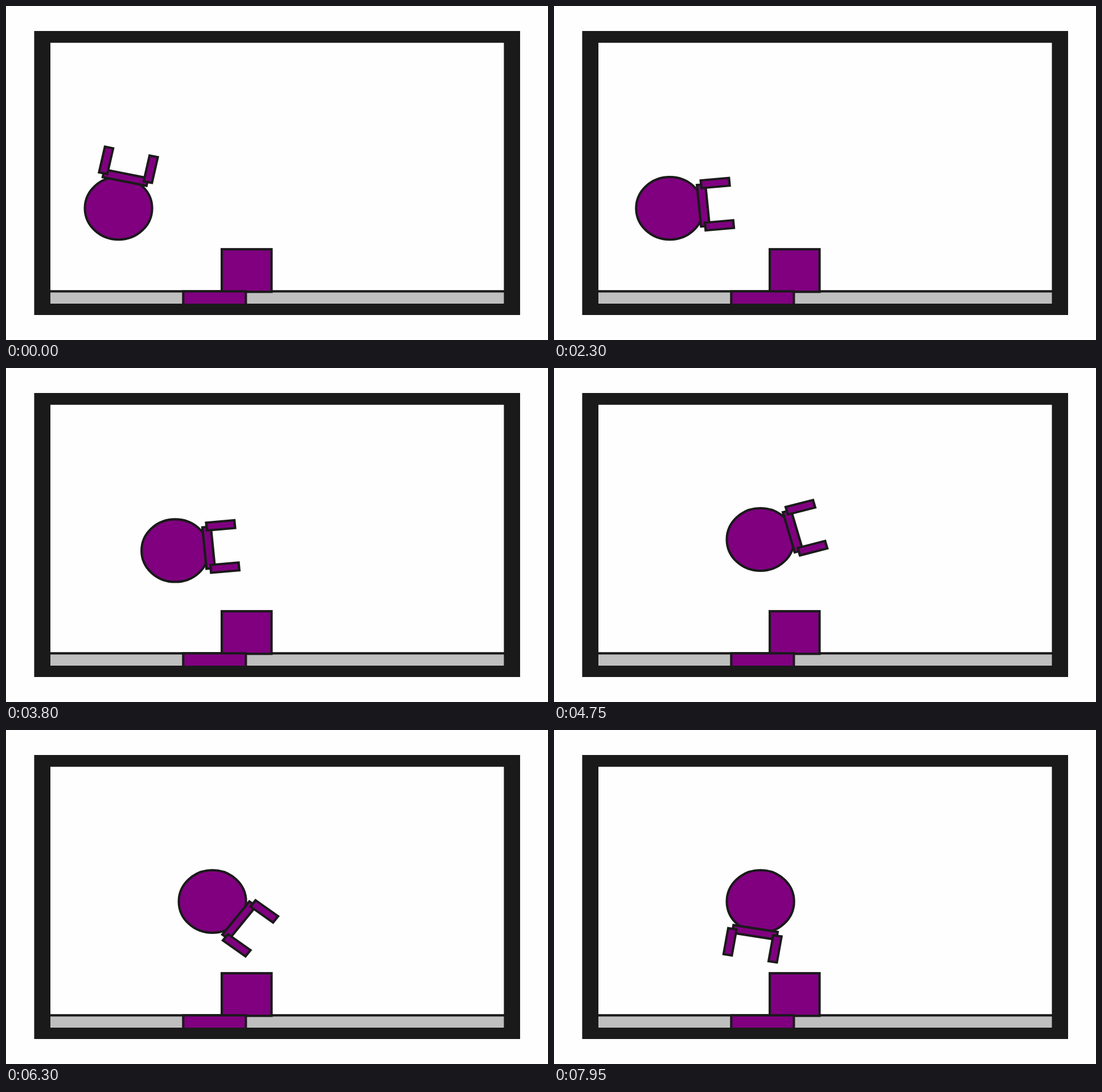
Animation, 952 px wide and 588 px high, one loop 8000 ms. Source, as an HTML page:

```html
<!DOCTYPE html>
<html lang="en">
<head>
<meta charset="utf-8">
<title>Gripper robot</title>
<style>
  html, body { margin: 0; width: 100%; height: 100%; overflow: hidden; background: #fefefe; }
  svg { display: block; width: 100vw; height: 100vh; }
  .shape { fill: #800080; stroke: #1a1a1a; stroke-width: 4.1; }
  #robot * { vector-effect: non-scaling-stroke; }
</style>
</head>
<body>
<svg viewBox="0 0 952 588">
  <rect x="64" y="502.3" width="824" height="30" fill="#bfbfbf" stroke="#1a1a1a" stroke-width="4.1"/>
  <rect class="shape" x="379" y="428.2" width="87.4" height="75"/>
  <rect class="shape" x="311.3" y="502.3" width="110" height="30"/>
  <path d="M49.5 44H903V544H49.5ZM78 64.7V524H874.5V64.7Z" fill="#1a1a1a" fill-rule="evenodd"/>
  <g id="robot" class="shape">
    <circle r=".24"/>
    <g id="arm">
      <rect x=".21" y="-.16" width=".06" height=".32"/>
      <rect x=".24" y=".133" width=".202" height=".06"/>
      <rect x=".24" y="-.193" width=".202" height=".06"/>
    </g>
  </g>
</svg>
<script>
const LOOP = 8000, STEP = 50;
const SCALE_X = 246, SCALE_Y = 229.5;

// Distance covered at time t by a move with steady speed and soft ends of length ramp
function move(t, start, end, amount, ramp) {
  const span = end - start, u = Math.min(Math.max(t - start, 0), span);
  const speed = amount / (span - ramp);
  if (u < ramp) return speed * u * u / (2 * ramp);
  if (u > span - ramp) return amount - speed * (span - u) ** 2 / (2 * ramp);
  return speed * (u - ramp / 2);
}

// A small nudge, then a glide that picks up speed halfway
const baseX = t => 197.6 + move(t, 0, 650, 4.4, 150)
  + move(t, 2200, 4700, 134.2, 220) + move(t, 3400, 4700, 26.4, 150);

const baseY = t => 356.1 - move(t, 2400, 4617, 54.2, 130);

// Each swing down is preceded by a short swing up
const angle = t => 78
  + move(t, 300, 820, 5.7, 150) - move(t, 820, 2287, 78.4, 225)
  + move(t, 4453, 4920, 14.7, 125) - move(t, 4920, 7800, 119.5, 100);

const robot = document.getElementById('robot');
const arm = document.getElementById('arm');

function draw(now) {
  const t = Math.floor(now % LOOP / STEP) * STEP;
  robot.setAttribute('transform',
    `translate(${baseX(t)} ${baseY(t)}) scale(${SCALE_X} ${-SCALE_Y})`);
  arm.setAttribute('transform', `rotate(${angle(t)})`);
}

const start = performance.now();
function tick() {
  draw(performance.now() - start);
  requestAnimationFrame(tick);
}
tick();
</script>
</body>
</html>
```
